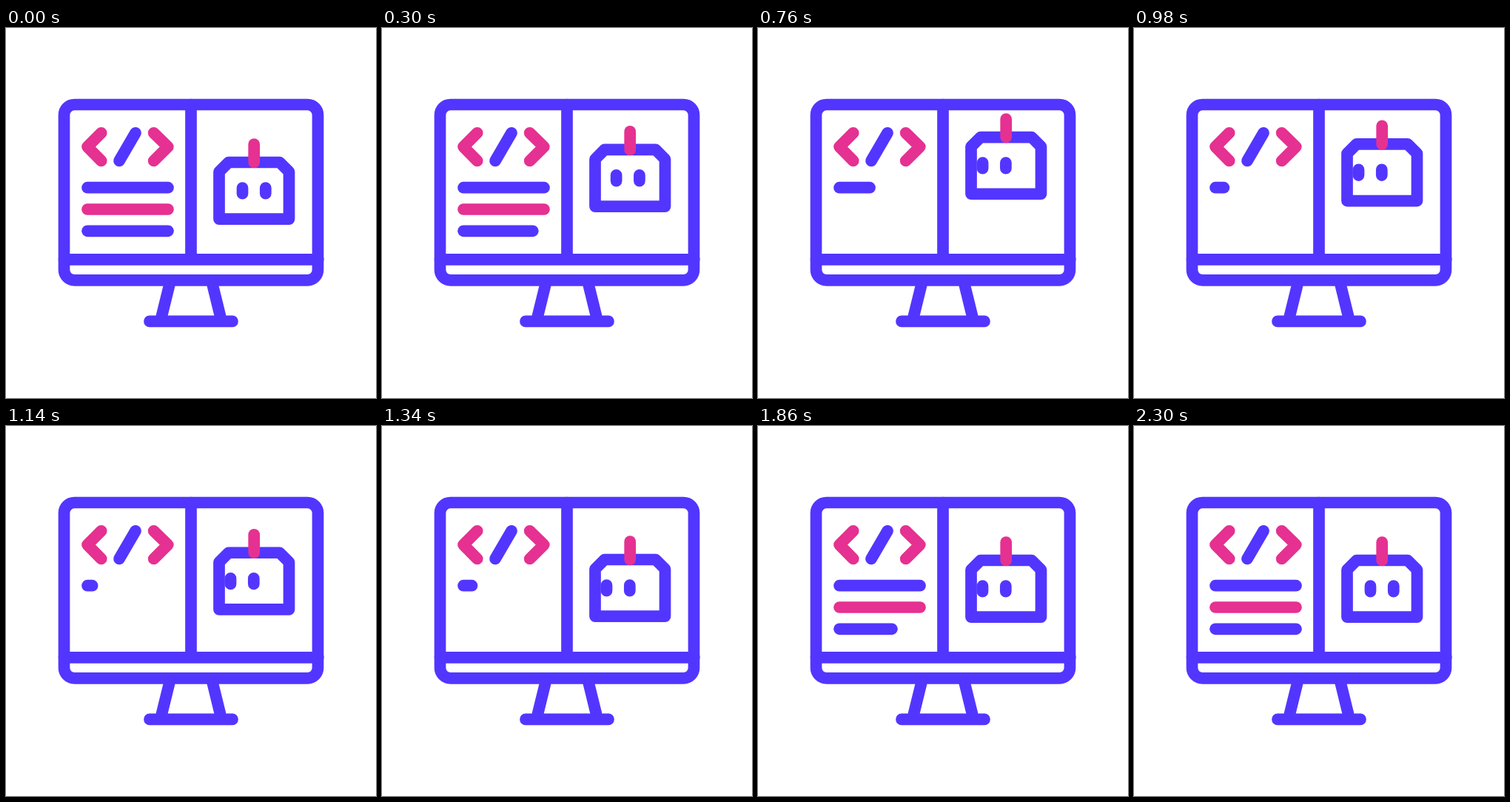
Animation, 500 px wide and 500 px high, one loop 2400 ms. Source, as an HTML page:

```html
<!DOCTYPE html>
<html lang="en">
<head>
<meta charset="utf-8">
<title>Code and robot</title>
<style>
  html, body { margin: 0; width: 100%; height: 100%; overflow: hidden; background: #fff; }
  svg { display: block; width: 100vw; height: 100vh; }
  g { fill: none; stroke: #5236ff; stroke-width: 15.7; stroke-linecap: round; stroke-linejoin: round; }
  .pink { stroke: #e53191; }
</style>
</head>
<body>
<svg viewBox="0 0 500 500">
  <g>
    <rect x="78.5" y="103.5" width="343" height="237.3" rx="14"/>
    <path d="M78.5 312.8H421.8M250 103.5V312.8"/>
    <path d="M222.3 341L208.7 396.4M277.7 341L291.3 396.4M194 396.4H306"/>
    <path class="pink" d="M128.7 141.8L110 160.5L128.7 179.5M199.7 141.8L218.8 160.5L199.7 179.5"/>
    <path d="M175 141.8L153 179.5"/>
    <line class="row" x1="110" x2="219" y1="215.7" y2="215.7"/>
    <line class="row pink" x1="110" x2="219" y1="245" y2="245"/>
    <line class="row" x1="110" x2="219" y1="274.3" y2="274.3"/>
  </g>
  <g id="robot">
    <path d="M288 194.3L300.8 181.5H369.7L382.5 194.3V258.2H288Z"/>
    <path class="pink" d="M335.2 157V181.5"/>
    <path id="eyes" d="M319.5 216V223.7M350.8 216V223.7"/>
  </g>
</svg>
<script>
const LOOP = 2400, LEFT = 110, LEN = 109;
const rows = [...document.querySelectorAll('.row')];
const robot = document.getElementById('robot');
const eyes = document.getElementById('eyes');

// Cubic bezier easing with end handles at heights 0 and 1
const ease = (x1, x2) => x => {
  let lo = 0, hi = 1;
  for (let i = 0; i < 24; i++) {
    const t = (lo + hi) / 2, u = 1 - t;
    if (3 * x1 * t * u * u + 3 * x2 * t * t * u + t * t * t < x) lo = t; else hi = t;
  }
  return lo * lo * (3 - 2 * lo);
};
const soft = ease(1 / 3, 2 / 3), sharp = ease(0.833, 0.167), drop = ease(0.47, 0.77);

// Steps: [start, end, from, to, easing]; values hold between steps
const shown = [[0, 1167, 1, 0.02, sharp], [1167, 2250, 0.02, 1, sharp]];
const hop = [
  [0, 600, 0, -34, soft], [740, 1300, -34, 0, drop],
  [1300, 1570, 0, -16, soft], [1570, 1790, -16, 0, soft]
];
const look = [[120, 790, 0, -16, soft], [1870, 2310, -16, 0, soft]];

function valueAt(steps, t) {
  let v = steps[0][2];
  for (const [start, end, from, to, fn] of steps) {
    if (t < start) break;
    v = t >= end ? to : from + (to - from) * fn((t - start) / (end - start));
  }
  return v;
}

function draw(t) {
  const p = valueAt(shown, t) * rows.length;
  rows.forEach((row, i) => {
    const part = Math.min(1, Math.max(0, p - i));
    row.setAttribute('x2', LEFT + LEN * part);
    row.setAttribute('visibility', part > 0 ? 'visible' : 'hidden');
  });
  robot.setAttribute('transform', `translate(0 ${valueAt(hop, t)})`);
  eyes.setAttribute('transform', `translate(${valueAt(look, t)} 0)`);
}

const begin = performance.now();
function tick() {
  draw((performance.now() - begin) % LOOP);
  requestAnimationFrame(tick);
}
tick();
</script>
</body>
</html>
```
